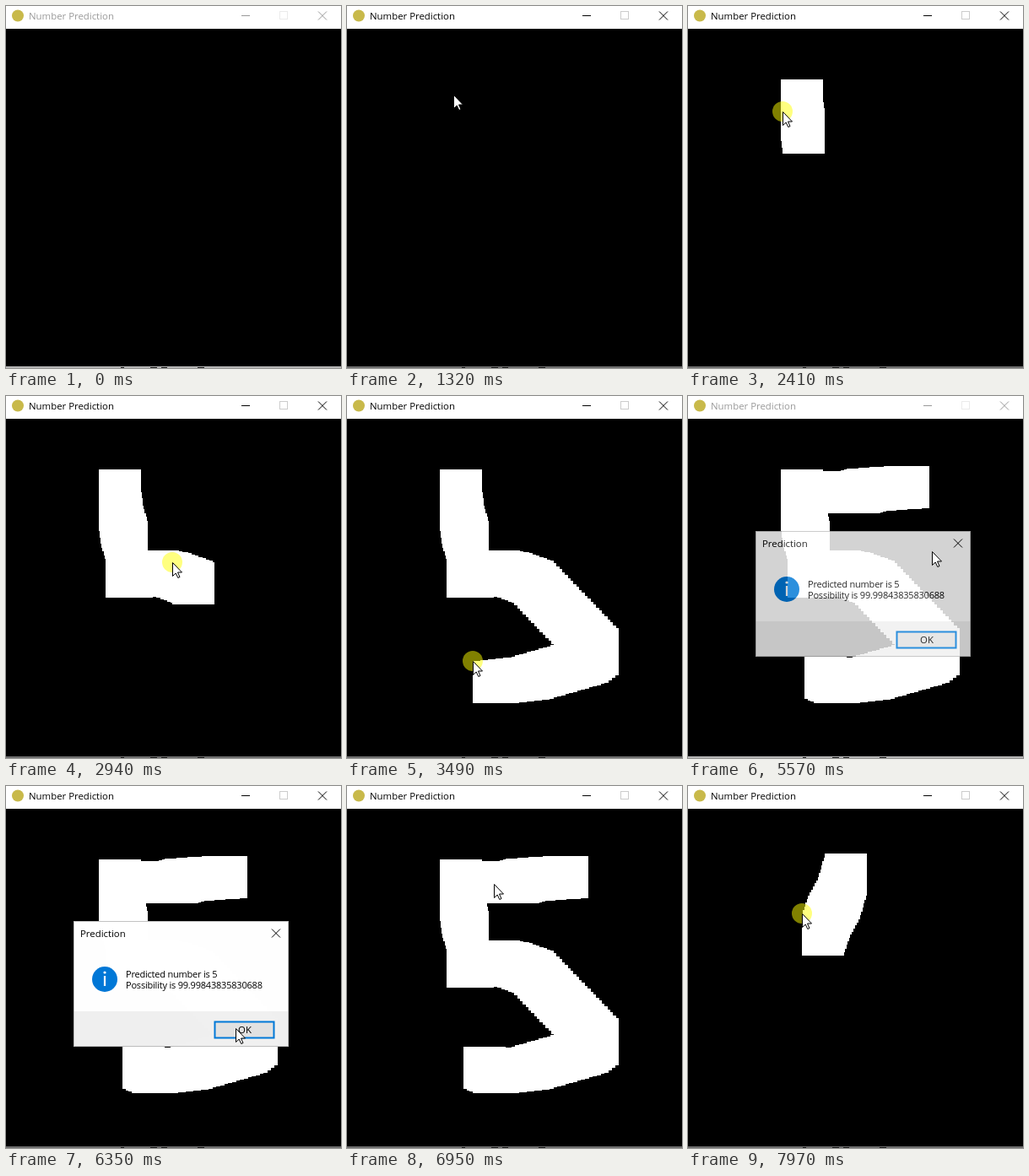
Recreate the animation shown at these times as an HTML page with a canvas. Size 397x429 px, loop 8000 ms.

```html
<!DOCTYPE html>
<html lang="en">
<head>
<meta charset="utf-8">
<title>Number Prediction</title>
<style>
  html, body { margin: 0; width: 397px; height: 429px; overflow: hidden; background: #000; }
  canvas, svg { position: absolute; left: 0; top: 0; display: block; }
  text { font: 11.4px "Open Sans", "Noto Sans", sans-serif; fill: #000; }
  .line { fill: none; stroke: #000; }
  .box { fill: none; stroke: #ccc; }
  .edge { fill: #6c6c6c; }
  .idle .caption { fill: #999; }
  .idle .line { stroke: #999; }
  .idle .box { stroke: #ebebeb; }
  .idle .edge { fill: #b4b4b4; }
  .body text { font-size: 11px; letter-spacing: -.2px; }
  #dialog { transform-origin: 207px 235px; }
</style>
</head>
<body>
<canvas id="pad" width="397" height="429"></canvas>
<svg width="397" height="429" viewBox="0 0 397 429">
  <g id="frame">
    <rect width="397" height="27" fill="#fff"/>
    <circle cx="14" cy="11.5" r="7" fill="#c8b94a"/>
    <text class="caption" x="27" y="16">Number Prediction</text>
    <path class="line" d="M279 11.5h10"/>
    <rect class="box" x="324.5" y="6.5" width="9" height="9"/>
    <path class="line" d="M370 6.5l10 10m0-10l-10 10"/>
    <rect class="edge" y="427" width="397" height="2"/>
    <path d="M136 428.5h4M171 428.5h8M184 428.5h7M227 428.5h8" stroke="#111"/>
  </g>

  <g id="dialog">
    <rect x="80" y="160" width="255" height="149" fill="#fff"/>
    <rect x="80" y="267" width="255" height="42" fill="#f0f0f0"/>
    <rect x="80.5" y="160.5" width="254" height="148" fill="none" stroke="#999" stroke-opacity=".6"/>
    <text x="88" y="179">Prediction</text>
    <path class="line" d="M315 169.5l10 10m0-10l-10 10"/>
    <circle cx="117" cy="229" r="15" fill="#0078d7"/>
    <path d="M117 225v12" stroke="#fff" stroke-width="2.2"/>
    <circle cx="117" cy="221" r="1.6" fill="#fff"/>
    <g class="body">
      <text x="142" y="227">Predicted number is 5</text>
      <text x="142" y="240">Possibility is 99.99843835830688</text>
    </g>
    <rect x="247.5" y="279.5" width="70" height="19" fill="#e1e1e1" stroke="#0078d7" stroke-width="2"/>
    <text x="283" y="293" text-anchor="middle">OK</text>
  </g>

  <g id="pointer">
    <circle id="halo" r="12" fill="#ff0" fill-opacity=".5"/>
    <path d="M.5 .5V16.5L4.2 13L6.8 18.5L9 17.5L6.5 12H11.5Z" fill="#fff" stroke="#000"/>
  </g>
</svg>
<script>
const LOOP = 8000, TICK = 77.2, PHASE = 10, BRUSH = 50, GAP = 5;
const CLEAR = 7020, OPEN = 5400, CLOSE = 6340;

// Pointer stops: time, x, y and, where it rests, for how long
const stops = [
  [60, 251, 332], [130, 212, 250, 240], [680, 84, 63, 150], [1140, 126, 105, 170],
  [1560, 109, 90], [1700, 111, 95, 150], [2010, 111, 89], [2180, 110, 87],
  [2326, 110, 110], [2403, 112, 125], [2490, 118, 148], [2590, 118, 189],
  [2620, 124, 189], [2660, 131, 184], [2730, 155, 183], [2790, 170, 186],
  [2860, 195, 195], [3090, 272, 275], [3150, 272, 281], [3220, 260, 290],
  [3360, 190, 310], [3484, 149, 314], [3600, 138, 309, 50], [3790, 134, 130],
  [3950, 133, 89, 150], [4410, 178, 89], [4480, 188, 86], [4564, 206, 85],
  [4800, 236, 83, 290], [5250, 289, 184, 370], [5990, 272, 287, 370],
  [6860, 174, 116, 100], [7340, 162, 80, 160], [7740, 154, 108],
  [7884, 142, 130], [7961, 135, 151]
];
const track = stops.flatMap(([t, x, y, rest]) =>
  rest ? [[t, x, y], [t + rest, x, y]] : [[t, x, y]]);

// Button held: from, to
const presses = [[2180, 3640], [4020, 4930], [7480, LOOP]];

const $ = id => document.getElementById(id);
const ctx = $("pad").getContext("2d");
const clamp = v => Math.max(0, Math.min(1, v));
const mix = (a, b, k) => a + (b - a) * k;

function pointerAt(t) {
  const i = track.findIndex(p => p[0] > t);
  if (i < 0) return track[track.length - 1].slice(1);
  if (i === 0) return track[0].slice(1);
  const [t0, x0, y0] = track[i - 1], [t1, x1, y1] = track[i];
  const k = (t - t0) / (t1 - t0);
  return [mix(x0, x1, k), mix(y0, y1, k)];
}

function stamp([x, y]) {
  ctx.fillRect(Math.round(x), Math.round(y), BRUSH, BRUSH);
}

function drawStroke(from, to) {
  for (let i = 1; i < track.length; i++) {
    const [t0, x0, y0] = track[i - 1], [t1, x1, y1] = track[i];
    if (t1 < from || t0 > to) continue;
    const n = Math.max(1, Math.ceil(Math.hypot(x1 - x0, y1 - y0) / GAP));
    for (let j = 0; j <= n; j++) {
      const t = mix(t0, t1, j / n);
      if (t >= from && t <= to) stamp([mix(x0, x1, j / n), mix(y0, y1, j / n)]);
    }
  }
  stamp(pointerAt(to));
}

function render(t) {
  ctx.fillStyle = "#000";
  ctx.fillRect(0, 0, 397, 429);
  ctx.fillStyle = "#fff";
  for (const [from, to] of presses) {
    if (t >= from && (t < CLEAR || from > CLEAR)) drawStroke(from, Math.min(t, to));
  }

  const idle = t < 830 || (t >= OPEN && t < CLOSE);
  $("frame").setAttribute("class", idle ? "idle" : "");

  const fadeIn = t < OPEN ? 0 : clamp((t - OPEN + 30) / 240);
  const shown = fadeIn * clamp(1 - (t - CLOSE) / 160);
  const size = t < CLOSE ? mix(.94, 1, clamp((t - OPEN) / 150)) : mix(.94, 1, shown);
  $("dialog").style.opacity = shown;
  $("dialog").style.transform = `scale(${size})`;

  const [x, y] = pointerAt(t).map(Math.round);
  const held = presses.some(([from, to]) => t >= from && t < to);
  $("pointer").setAttribute("transform", `translate(${x} ${y})`);
  $("pointer").style.display = t < 60 ? "none" : "";
  $("halo").style.display = held ? "" : "none";
}

// The picture is held for one tick at a time.
function frame() {
  const t = performance.now() % LOOP;
  render(Math.max(0, Math.floor((t - PHASE) / TICK) * TICK + PHASE));
  requestAnimationFrame(frame);
}
frame();
</script>
</body>
</html>
```
